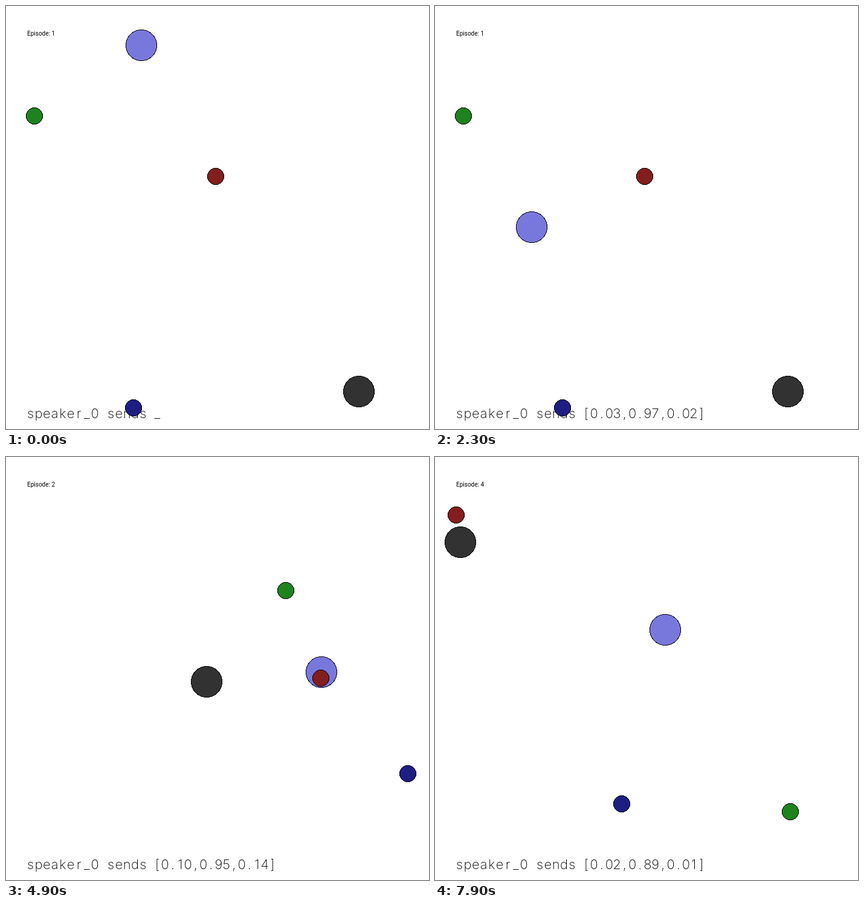
These frames come from a looping animation (700x700 px, 8000 ms). An HTML page with a canvas:

```html
<!DOCTYPE html>
<html lang="en">
<head>
<meta charset="utf-8">
<title>Speaker and listener</title>
<style>
  html, body { margin: 0; width: 100%; height: 100%; overflow: hidden; background: #fff; }
  canvas { display: block; }
</style>
</head>
<body>
<canvas id="stage" width="700" height="700"></canvas>
<script>
const ctx = document.getElementById('stage').getContext('2d');
const STEP_MS = 100, STEPS = 80, EPISODE_STEPS = 26;

// Fixed bodies are [x, y]; the listener glides through a few [step, x, y] keys.
const episodes = [
  { speaker: [584, 638], red: [347, 282], green: [47, 182], blue: [211, 665],
    path: [[0, 224, 65], [4, 171, 160], [9, 148, 300], [16, 157, 355], [25, 161, 368]] },
  { speaker: [332, 372], red: [521, 366], green: [463, 221], blue: [665, 524],
    path: [[0, 561, 336], [3, 543, 332], [14, 533, 345], [25, 520, 358]] },
  { speaker: [512, 341], red: [332, 44], green: [665, 457], blue: [248, 240],
    path: [[0, 35, 435], [3, 120, 369], [8, 304, 173], [11, 383, 108],
           [14, 422, 119], [25, 452, 168]] },
  { speaker: [42, 141], red: [35, 96], green: [588, 587], blue: [309, 574],
    path: [[0, 384, 273], [1, 381, 286]] }
];

function noise(n) {
  const v = Math.sin(n * 12.9898 + 4.1) * 43758.5453;
  return v - Math.floor(v);
}

function message(n) {
  const values = [
    0.2 * noise(n),
    Math.min(1, 0.8 + 0.25 * noise(n + 100)),
    0.16 * noise(n + 200) ** 2
  ];
  return `[${values.map(v => v.toFixed(2)).join()}]`;
}

// Cubic Hermite curve through the keys, starting at rest.
function pointAt(path, step) {
  let i = 0;
  while (i < path.length - 2 && step >= path[i + 1][0]) i++;
  const a = path[i], b = path[i + 1], span = b[0] - a[0], u = (step - a[0]) / span;
  const slope = (k, axis) => {
    if (k === 0) return 0;
    const p = path[k - 1], q = path[Math.min(k + 1, path.length - 1)];
    return (q[axis] - p[axis]) / (q[0] - p[0]);
  };
  return [1, 2].map(axis =>
    a[axis] * (1 + 2 * u) * (1 - u) ** 2 + b[axis] * u * u * (3 - 2 * u) +
    span * (slope(i, axis) * u * (1 - u) ** 2 + slope(i + 1, axis) * u * u * (u - 1)));
}

// Hard-edged disc, filled row by row.
function fillDisc(x, y, radius, color) {
  ctx.fillStyle = color;
  for (let row = -radius; row < radius; row++) {
    const half = Math.round(Math.sqrt(radius ** 2 - (row + 0.5) ** 2));
    ctx.fillRect(x - half, y + row, 2 * half, 1);
  }
}

function body(point, radius, color) {
  const [x, y] = point.map(Math.round);
  fillDisc(x, y, radius, '#000');
  fillDisc(x, y, radius - 1, color);
}

function spacedText(text, x, y, pitch) {
  ctx.font = '200 22px Inter, Lato, sans-serif';
  ctx.textAlign = 'center';
  [...text].forEach((c, i) => ctx.fillText(c, x + pitch * (i + 0.5), y));
}

function draw(n) {
  const index = Math.floor(n / EPISODE_STEPS), step = n % EPISODE_STEPS;
  const scene = episodes[index];
  ctx.fillStyle = '#fff';
  ctx.fillRect(0, 0, 700, 700);

  ctx.fillStyle = '#000';
  spacedText('speaker_0 sends', 34, 682, 13.3);
  spacedText(step ? message(n) : '_', 244, 682, 12.7);
  ctx.font = '10px Roboto, "Liberation Sans", sans-serif';
  ctx.textAlign = 'left';
  ctx.fillText('Episode: ' + (index + 1), 35, 49);

  body(scene.speaker, 26, 'rgb(50,50,50)');
  body(pointAt(scene.path, step), 26, 'rgb(120,120,220)');
  body(scene.red, 14, 'rgb(130,30,30)');
  body(scene.green, 14, 'rgb(30,130,30)');
  body(scene.blue, 14, 'rgb(30,30,130)');
}

function tick() {
  draw(Math.floor(performance.now() / STEP_MS) % STEPS);
  requestAnimationFrame(tick);
}
tick();
</script>
</body>
</html>
```
